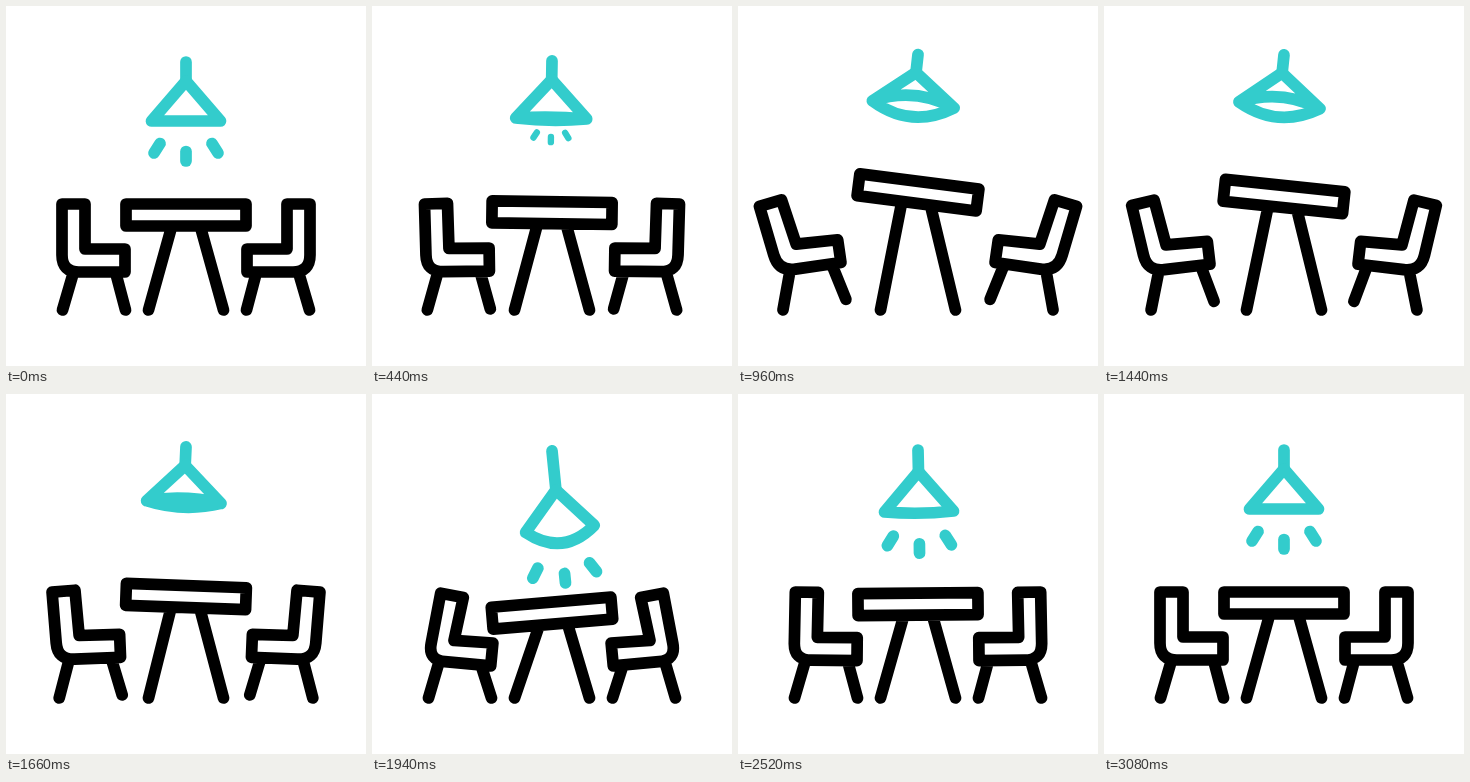
Animation, 360 px wide and 360 px high, one loop 3600 ms. Source, as an HTML page:

```html
<!DOCTYPE html>
<html lang="en">
<head>
<meta charset="utf-8">
<title>Dining table</title>
<style>
  html, body { margin: 0; width: 100%; height: 100%; overflow: hidden; background: #fff; }
  svg { display: block; width: 100vw; height: 100vh; }
  path { fill: none; stroke-width: 11.7; stroke-linecap: round; stroke-linejoin: round; }
</style>
</head>
<body>
<svg viewBox="0 0 360 360">
  <g stroke="#000">
    <path id="chair"/>
    <use href="#chair" transform="matrix(-1 0 0 1 360 0)"/>
    <path id="table"/>
  </g>
  <g stroke="#33cccc">
    <path id="stem"/>
    <g id="lamp">
      <path id="shade"/>
      <g id="rays">
        <path d="M-26 22.5L-32 32"/>
        <path d="M0 30.5V40"/>
        <path d="M26 22.5L32 32"/>
      </g>
    </g>
  </g>
</svg>
<script>
const LOOP = 3600;
const set = (id, name, value) => document.getElementById(id).setAttribute(name, value);

const easeIn = u => u * u;
const easeOut = u => 1 - (1 - u) ** 2;
const easeInOut = u => u < 0.5 ? 4 * u ** 3 : 1 - 4 * (1 - u) ** 3;

// Tip back, fall through the upright pose, overshoot forward, settle.
const moves = [
  { start: 140, end: 1180, from: 0, to: 1, ease: easeInOut },
  { start: 1180, end: 1745, from: 1, to: 0, ease: easeIn },
  { start: 1745, end: 2045, from: 0, to: -0.72, ease: easeOut },
  { start: 2045, end: 2710, from: -0.72, to: 0, ease: easeInOut }
];

function leanAt(t) {
  const move = moves.find(m => t >= m.start && t < m.end);
  if (!move) return 0;
  const u = (t - move.start) / (move.end - move.start);
  return move.from + (move.to - move.from) * move.ease(u);
}

// Returns a function that places local points around a turned origin.
function frame(ox, oy, degrees) {
  const a = degrees * Math.PI / 180, c = Math.cos(a), s = Math.sin(a);
  return (x, y) => `${(ox + x * c - y * s).toFixed(2)} ${(oy + x * s + y * c).toFixed(2)}`;
}

// The seat turns around its rear corner; the back bends twice as far.
function drawChair(lean) {
  const back = Math.max(lean, 0);
  const x = 56 - 16 * back, y = 266 - 0.5 * back;
  const angle = -8.5 * lean;
  const seat = frame(x, y, angle);
  const fold = frame(x, y, 1.5 * angle);
  const rest = frame(x, y, 2 * angle);
  const foot = frame(-12 * back, 0, 0);
  set('chair', 'd',
    `M${rest(0, -68)}L${rest(23, -68)}L${fold(23, -23)}L${seat(63, -23)}L${seat(63, 0)}` +
    `L${seat(17, 0)}Q${seat(0, 0)} ${rest(0, -17)}Z` +
    `M${seat(11, 2)}L${foot(56.5, 304)}` +
    `M${seat(54, 2)}L${foot(119.5, 304 - 11 * back)}`);
}

function drawTable(lean) {
  const lift = 16 * lean + 7.5 * Math.max(lean, 0);
  const top = frame(180, 209 - lift, 7.6 * lean);
  set('table', 'd',
    `M${top(-60, -11)}L${top(60, -11)}L${top(60, 11)}L${top(-60, 11)}Z` +
    `M${top(-15, 14)}L142.5 304M${top(15, 14)}L217.5 304`);
}

// Swinging up opens the shade's rim into an ellipse; swinging down bulges it.
function drawLamp(lean) {
  const swing = Math.sin(lean * Math.PI / 2);
  const up = Math.max(swing, 0), down = Math.max(-swing, 0);
  const x = 180 - 2 * up + 4.7 * down;
  const y = 75 - 8.5 * up + 25 * down;
  const width = 34.5 + 6.5 * up;
  const height = 40 - 8 * up - down;
  const near = 12.5 * up + 17 * down;
  const far = -9 * up + 17 * down;
  const rim = sag => `L${-width} ${height}Q0 ${height + 2 * sag} ${width} ${height}Z`;
  const raySize = Math.max(0, 1 - 3 * up);

  set('stem', 'd', `M180 ${56 - 7.5 * up + down}L${x} ${y}`);
  set('lamp', 'transform', `translate(${x} ${y}) rotate(${5 * up - 7 * down})`);
  set('shade', 'd', `M0 0${rim(near)}${rim(far)}`);
  set('rays', 'transform', `translate(0 ${height + near}) scale(${raySize})`);
  set('rays', 'visibility', raySize > 0 ? 'visible' : 'hidden');
}

function render(t) {
  const lean = leanAt(t);
  drawChair(lean);
  drawTable(lean);
  drawLamp(lean);
}

const start = performance.now();
function tick() {
  render((performance.now() - start) % LOOP);
  requestAnimationFrame(tick);
}
render(0);
requestAnimationFrame(tick);
</script>
</body>
</html>
```
